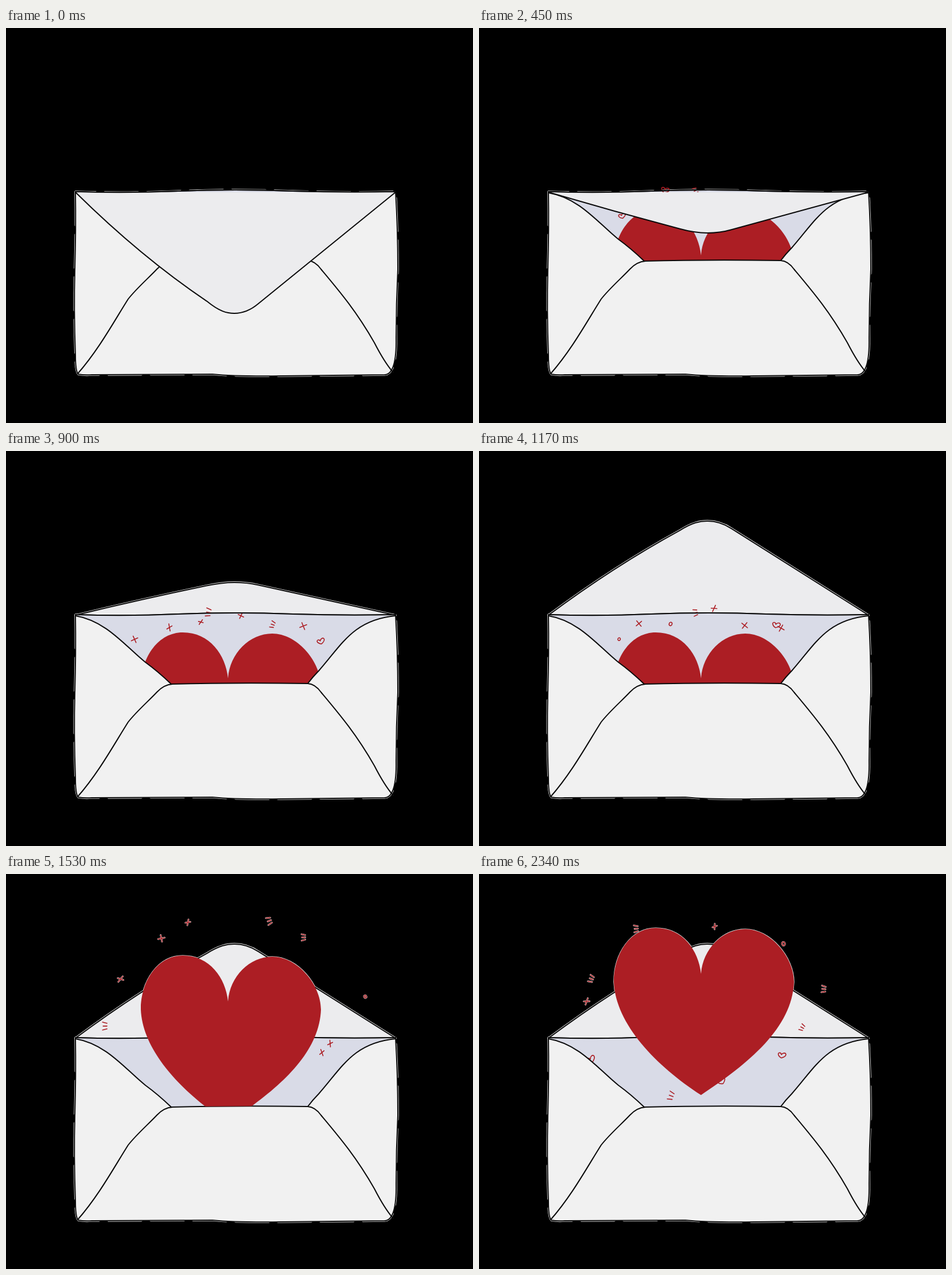
An HTML page with a canvas that plays this animation: 814 px wide and 688 px high, repeating every 2.43 s.

```html
<!DOCTYPE html>
<html lang="en">
<head>
<meta charset="utf-8">
<title>Love letter</title>
<style>
html, body { margin: 0; width: 100%; height: 100%; overflow: hidden; background: #000 }
canvas { display: block }
</style>
</head>
<body>
<canvas id="stage" width="814" height="688"></canvas>
<script>
const ctx = document.getElementById('stage').getContext('2d');
const STEP = 90, STEPS = 27, HINGE = 285, RISE = 13;
const RED = '#ac1e24', INK = '#0a0a0a', FRINGE = '#d8d8d8';

// Strokes that continue from the previous point, so they can be chained.
const topEdge = 'Q590 287 500 284Q400 280 300 284Q210 288 121 285';
const leftSide = 'C175 296 208 340 243 368Q265 384 288 406';
const brim = 'Q400 403 526 405';
const rightSide = 'Q535 393 545 383C585 338 605 294 679 287';

const hem = new Path2D('M679 285' + topEdge);
const body = new Path2D('M121 286Q122 350 120 420T121 570Q121 598 126 603Q136 605 150 604L360 603' +
  'Q400 607 480 606L660 604Q681 603 680 540Q680 480 683 420Q683 350 679 285' + topEdge + 'Z');
const mouth = new Path2D('M121 287' + leftSide + brim + rightSide + topEdge + 'Z');
const opening = new Path2D('M0 287H121' + leftSide + brim + rightSide + 'H814V0H0Z');
const folds = new Path2D('M121 287' + leftSide + brim + rightSide +
  'M125 602C162 560 190 508 213 472C228 453 250 434 263 420Q275 407 290 406' +
  'M526 405Q539 406 549 420C580 457 610 492 642 548Q660 583 675 600');
const heart = new Path2D('M387 174C383 133 355 94 308 94C265 94 235 138 235 188C238 262 310 335 387 385' +
  'C470 330 546 268 549 188C549 145 508 96 464 96C425 96 390 130 387 174Z');

const glyphs = [
  'M-4-5L4 5M5-4L-5 4',
  'M1-6L-1 6M-5 1L5-1',
  'M2.5 0A2.5 3 0 1 1-2.5 0A2.5 3 0 1 1 2.5 0',
  'M-1-1C-3-5-8-3-7 0Q-5 4 1 5Q8 0 7-4C5-8 0-5-1-1',
  'M-5-7L3-5M-4 0L3 0M-5 7L3 5'
].map(d => new Path2D(d));

// Value at a step, linear between [step, value] pairs.
function track(keys, step) {
  const i = keys.findIndex(k => step <= k[0]);
  if (i < 1) return keys.at(i)[1];
  const [[s0, v0], [s1, v1]] = keys.slice(i - 1, i + 1);
  return v0 + (v1 - v0) * (step - s0) / (s1 - s0);
}
const flapDepth = [[1, 212], [5, 72], [7, 2], [10, -56], [13, -163]];
const heartDrop = [[RISE, 222], [17, 48], [18, 10], [19, 0]];

// Triangle with a rounded tip; positive depth hangs down, negative stands up.
function flapPath(depth) {
  const y = part => HINGE + depth * part;
  const bulge = 0.0004 * depth * Math.abs(depth);
  return new Path2D(`M121 286Q235 ${y(.45) + bulge} 350 ${y(.9)}C372 ${y(.985)} 385 ${y(1)} 398 ${y(1)}` +
    `C412 ${y(1)} 425 ${y(.98)} 440 ${y(.92)}L679 286`);
}

const random = n => { const v = Math.sin(n * 127.1 + 11.7) * 43758.5453; return v - Math.floor(v); };

// New scatter each step: a row over the hidden heart, then a ring around it.
function sparkles(step) {
  const path = new Path2D();
  if (step < 2) return path;
  const ring = step > RISE;
  const count = ring ? Math.round(10 + 9 * Math.sin((step - 15) / 12 * Math.PI) ** 2) : 8;
  for (let i = 0; i < count; i++) {
    const rnd = k => random(step * 97 + i * 5 + k);
    const part = (i + rnd(0)) / count, u = part * 2 - 1;
    const angle = part * 2 * Math.PI, reach = .85 + .3 * rnd(1);
    const x = ring ? 395 + 205 * reach * Math.cos(angle) : 390 + 175 * u;
    const y = ring ? 228 + 155 * reach * Math.sin(angle) : 285 + 45 * u * u + 30 * (rnd(1) - .5);
    const place = new DOMMatrix().translate(x, y).rotate(60 * (rnd(2) - .5)).scale(.75 + .3 * rnd(3));
    path.addPath(glyphs[Math.floor(rnd(4) * glyphs.length)], place);
  }
  return path;
}

function fill(path, color) { ctx.fillStyle = color; ctx.fill(path); }
function stroke(path, color, width) { ctx.strokeStyle = color; ctx.lineWidth = width; ctx.stroke(path); }

function drawFlap(path) {
  const area = new Path2D(path);
  area.addPath(hem);
  fill(path, '#ececee');
  stroke(area, INK, 2);
}

function inOpening(paint, drop = 0) {
  ctx.save();
  ctx.clip(opening);
  ctx.translate(0, drop);
  paint();
  ctx.restore();
}

function draw(step) {
  const depth = track(flapDepth, step), drop = track(heartDrop, step);
  const open = depth < 0, rising = step > RISE;
  const flap = flapPath(depth), marks = sparkles(step);
  const drawHeart = () => inOpening(() => fill(heart, RED), drop);
  ctx.fillStyle = '#000';
  ctx.fillRect(0, 0, 814, 688);
  ctx.lineCap = ctx.lineJoin = 'round';

  // Pale fringe, seen only against the black
  ctx.setLineDash([58, 16]);
  stroke(body, FRINGE, 3.6);
  ctx.setLineDash([]);
  if (open) {
    stroke(flap, FRINGE, 3.8);
    stroke(marks, '#f0e4e4', 2.8);
  }
  if (rising) inOpening(() => stroke(heart, FRINGE, 1.6), drop);

  if (open) drawFlap(flap);
  fill(body, '#f1f1f1');
  fill(mouth, '#d9dbe7');
  inOpening(() => stroke(marks, RED, 1.6));
  if (!rising) drawHeart();
  stroke(body, INK, 2);
  stroke(folds, INK, 2);
  if (rising) drawHeart();
  if (!open) drawFlap(flap);
}

function tick() {
  draw(Math.floor(performance.now() / STEP) % STEPS);
  requestAnimationFrame(tick);
}
tick();
</script>
</body>
</html>
```
